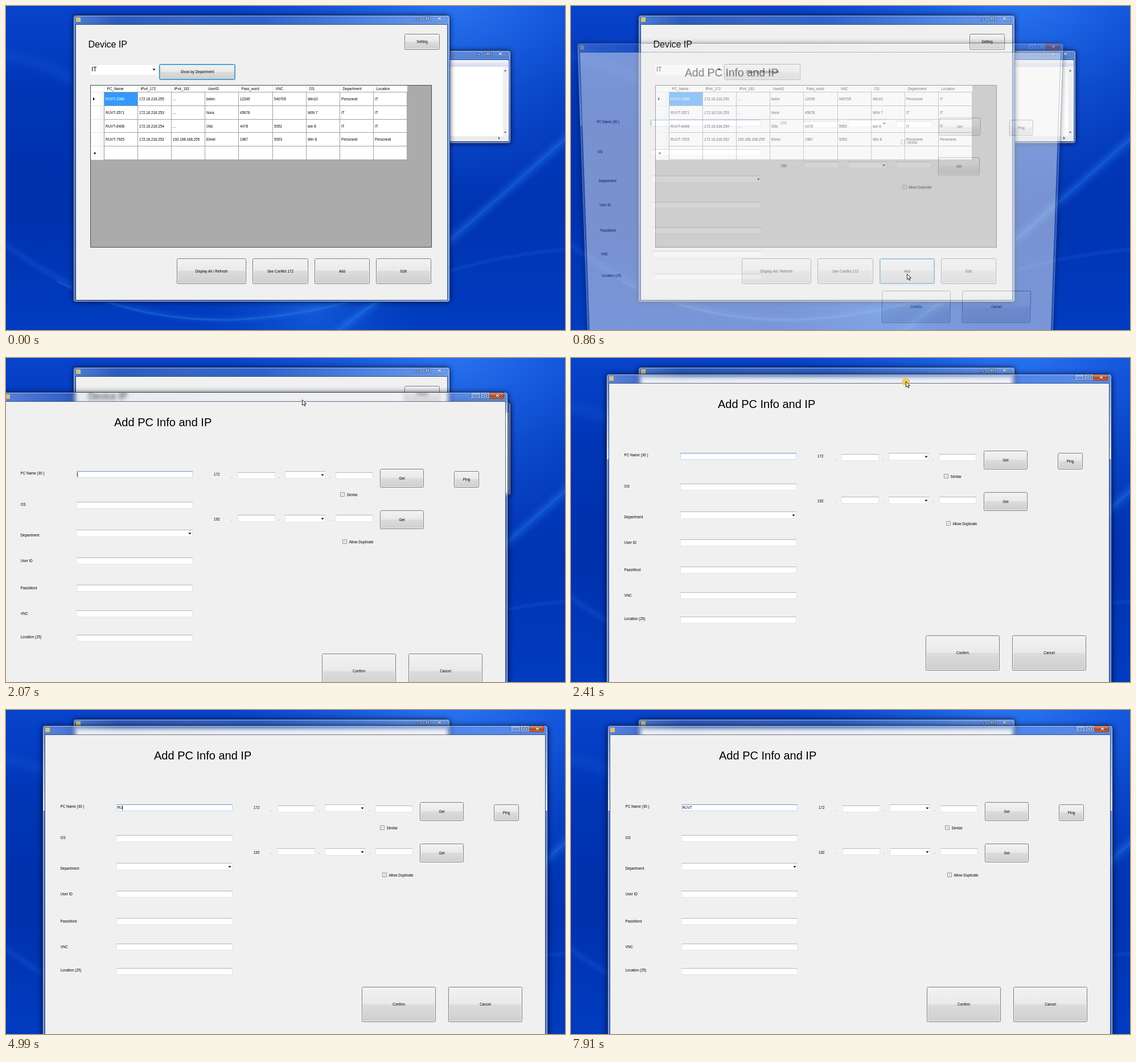
These frames come from a looping animation (982 by 570 pixels, 8 s). An HTML page with a canvas:

```html
<!DOCTYPE html>
<html lang="en">
<head>
<meta charset="utf-8">
<title>Device IP</title>
<style>
  html, body { margin: 0; width: 100%; height: 100%; overflow: hidden; background: #0037b9; }
  #stage { position: relative; width: 982px; height: 570px; overflow: hidden; }
  canvas { position: absolute; left: 0; top: 0; display: block; }
  #dialog {
    position: absolute; left: 64px; top: 27px; width: 888px; height: 651px;
    border-radius: 6px; transform-origin: 442px 170px;
    box-shadow: 0 1px 10px 1px rgba(0, 0, 20, .65);
  }
</style>
</head>
<body>
<div id="stage">
  <canvas id="desk" width="982" height="570"></canvas>
  <div id="dialog"><canvas id="form" width="888" height="651"></canvas></div>
  <canvas id="pointer" width="982" height="570"></canvas>
</div>
<script>
const LOOP = 8000, STEP = 171.9;
const FONT = '"Liberation Sans", Arial, sans-serif';
const context = id => document.getElementById(id).getContext('2d');
const desk = context('desk'), form = context('form'), pointer = context('pointer');
const dialog = document.getElementById('dialog');

const FIRST_SHOWN = 5;               // step at which the dialog starts to open
const TYPED = 'RUVT', KEY_STEPS = [25, 29, 33, 37];
const ADD = [591, 472], GRAB = [521, 74];

// ---------- drawing helpers ----------
function rect(c, x, y, w, h, color) {
  c.fillStyle = color;
  c.fillRect(x, y, w, h);
}

function outline(c, x, y, w, h, color, radius = 0) {
  c.beginPath();
  c.roundRect(x + .5, y + .5, w - 1, h - 1, radius);
  c.strokeStyle = color;
  c.lineWidth = 1;
  c.stroke();
}

function gradient(c, x0, y0, x1, y1, ...stops) {
  const g = c.createLinearGradient(x0, y0, x1, y1);
  stops.forEach(([at, color]) => g.addColorStop(at, color));
  return g;
}

// y is the middle of the capital letters
function label(c, text, x, y, size = 6.3, color = '#000', align = 'left') {
  c.font = `${size}px ${FONT}`;
  c.textAlign = align;
  c.fillStyle = color;
  c.fillText(text, x, y + size * .36);
}

function button(c, text, x, y, w, h, lit = false) {
  c.beginPath();
  c.roundRect(x, y, w, h, 2);
  c.fillStyle = gradient(c, 0, y, 0, y + h,
    [0, '#f3f3f3'], [.49, '#e9e9e9'], [.5, '#dcdcdc'], [1, '#cecece']);
  c.fill();
  outline(c, x, y, w, h, lit ? '#3c7fb1' : '#7c7c7c', 2);
  outline(c, x + 1, y + 1, w - 2, h - 2, lit ? '#5fc4f0' : '#f4f4f4', 1);
  label(c, text, x + w / 2, y + h / 2, 6.3, '#000', 'center');
}

function field(c, x, y, w, h = 12, focused = false) {
  rect(c, x, y, w, h, '#fff');
  outline(c, x, y, w, h, focused ? '#c3d8ef' : '#e3e5ea');
  rect(c, x, y, w, 1, focused ? '#6596dc' : '#b4b6bb');
}

function triangle(c, ...points) {
  c.beginPath();
  points.forEach(([x, y]) => c.lineTo(x, y));
  c.fillStyle = '#000';
  c.fill();
}

function combo(c, x, y, w, h = 13) {
  field(c, x, y, w, h);
  const ax = x + w - 5, ay = y + h / 2 - 1;
  triangle(c, [ax - 2.5, ay], [ax + 2.5, ay], [ax, ay + 3]);
}

function checkbox(c, text, x, y) {
  rect(c, x, y, 8, 8, '#fff');
  outline(c, x, y, 8, 8, '#8a8d92');
  rect(c, x + 2, y + 2, 4, 4, '#d9dce0');
  label(c, text, x + 11.5, y + 4.3);
}

function captionButtons(c, right, y, active) {
  const left = right - 65, line = `rgba(20,40,80,${active ? .5 : .12})`;
  if (active) {
    rect(c, left, y + 1, 59, 11, gradient(c, 0, y, 0, y + 12,
      [0, 'rgba(255,255,255,.45)'], [.5, 'rgba(255,255,255,.15)'], [1, 'rgba(255,255,255,.3)']));
    rect(c, right - 31, y + 1, 25, 11,
      gradient(c, 0, y, 0, y + 12, [0, '#dd9a82'], [.48, '#c55f3e'], [.5, '#b03a14'], [1, '#d0713a']));
  }
  outline(c, left, y, 59, 12, line, 2);
  [right - 48, right - 32].forEach(x => rect(c, x, y + 1, 1, 10, line));

  const edge = 'rgba(40,56,90,.75)';
  rect(c, right - 59, y + 6, 7, 3, edge);
  rect(c, right - 58, y + 7, 5, 1, '#fff');
  rect(c, right - 43, y + 3, 8, 6, edge);
  outline(c, right - 42, y + 4, 6, 4, '#fff');
  for (const [color, width] of [[edge, 2.6], ['#fff', 1.3]]) {
    c.beginPath();
    c.moveTo(right - 20, y + 4); c.lineTo(right - 15, y + 8);
    c.moveTo(right - 15, y + 4); c.lineTo(right - 20, y + 8);
    c.strokeStyle = color;
    c.lineWidth = width;
    c.stroke();
  }
}

function windowFrame(c, x, y, w, h, glass, active = false) {
  c.beginPath();
  c.roundRect(x, y, w, h, 5);
  c.fillStyle = glass;
  c.fill();
  c.shadowBlur = 0;
  outline(c, x, y, w, h, 'rgba(12,24,54,.8)', 5);
  outline(c, x + 1, y + 1, w - 2, h - 2, 'rgba(225,238,255,.65)', 4);
  if (active) {
    const shine = gradient(c, 0, y + 15, 0, y + 150,
      [0, 'rgba(255,255,255,.1)'], [1, 'rgba(255,255,255,.75)']);
    rect(c, x + 1, y + 15, 3, 135, shine);
    rect(c, x + w - 4, y + 15, 3, 135, shine);
  }
  rect(c, x + 5, y + 17, w - 10, h - 21, '#f0f0f0');
  outline(c, x + 4, y + 16, w - 8, h - 19, 'rgba(40,60,100,.7)');
  rect(c, x + 5, y + 4, 8, 8, '#d9c077');
  captionButtons(c, x + w - 1, y, active);
}

// ---------- desktop ----------
function glow(c, color, width, blur, path) {
  c.filter = `blur(${blur}px)`;
  c.strokeStyle = color;
  c.lineWidth = width;
  c.stroke(new Path2D(path));
  c.filter = 'none';
}

function radial(c, x, y, r, color, clear) {
  const g = c.createRadialGradient(x, y, 0, x, y, r);
  g.addColorStop(0, color);
  g.addColorStop(1, clear);
  rect(c, 0, 0, 982, 570, g);
}

function wallpaper(c) {
  rect(c, 0, 0, 982, 570, gradient(c, 0, 0, 0, 570,
    [0, '#0743cc'], [.25, '#0038b9'], [.65, '#0034b2'], [1, '#003cbf']));
  radial(c, 780, -50, 400, 'rgba(56,138,255,.8)', 'rgba(30,100,240,0)');
  radial(c, 50, 300, 210, 'rgba(0,44,165,.5)', 'rgba(0,44,165,0)');
  radial(c, 540, 530, 190, 'rgba(40,120,240,.5)', 'rgba(20,90,220,0)');
  glow(c, 'rgba(40,125,240,.35)', 6, 4, 'M-20 405Q170 556 400 552Q520 546 640 505');
  glow(c, 'rgba(90,170,255,.4)', 1.5, 1, 'M90 484Q230 556 400 552Q520 546 620 515');
  glow(c, 'rgba(40,130,245,.45)', 11, 6, 'M1000 218Q880 325 780 412T560 590');
  glow(c, 'rgba(70,150,255,.25)', 2, 1, 'M1000 218Q880 325 780 412T560 590');
  glow(c, 'rgba(45,125,240,.35)', 3, 2, 'M1000 426Q870 438 780 466T590 560');
  glow(c, 'rgba(35,105,235,.3)', 14, 8, 'M-20 82Q60 96 130 135');
}

function notesWindow(c) {
  c.shadowColor = 'rgba(0,0,20,.7)';
  c.shadowBlur = 10;
  windowFrame(c, 600, 78, 287, 164,
    gradient(c, 0, 78, 0, 242, [0, '#5a88dc'], [1, '#3d68c0']));
  rect(c, 770, 96, 113, 142, '#fff');
  rect(c, 770, 96, 113, 11, gradient(c, 0, 96, 0, 107, [0, '#f6f8fd'], [.5, '#dfe4f4'], [1, '#d6dced']));
  rect(c, 873, 108, 9, 121, '#efefef');
  rect(c, 770, 229, 113, 9, '#ececec');
  c.globalAlpha = .6;
  triangle(c, [875, 115], [879, 115], [877, 112]);
  triangle(c, [875, 221], [879, 221], [877, 224]);
  triangle(c, [865, 230], [865, 235], [868, 232.5]);
  c.globalAlpha = 1;
}

const COLUMNS = ['PC_Name', 'IPv4_172', 'IPv4_192', 'UserID', 'Pass_word', 'VNC', 'OS', 'Department', 'Location'];
const ROWS = [
  ['RUVT-2086', '172.16.216.255', '...', 'belim', '12345', '540705', 'Win10', 'Personnel', 'IT'],
  ['RUVT-3571', '172.16.216.253', '...', 'Nora', '45678', '', 'WIN 7', 'IT', 'IT'],
  ['RUVT-6408', '172.16.216.254', '...', 'Otis', '4478', '5052', 'win 8', 'IT', 'IT'],
  ['RUVT-7925', '172.16.216.252', '192.168.168.255', 'Elmer', '1987', '5053', 'Win 8', 'Personnel', 'Personnel'],
];

function deviceGrid(c) {
  const colX = i => Math.round(173 + i * 59.1), rowY = i => Math.round(151.3 + i * 23.7);
  const right = colX(9), bottom = rowY(5);
  rect(c, 148, 139, 600, 286, '#ababab');
  rect(c, 149, 140, right - 149, bottom - 140, '#fff');
  rect(c, 149, 151, 23, bottom - 151, gradient(c, 149, 0, 172, 0, [0, '#fff'], [.6, '#fcfdfe'], [1, '#f1f4f8']));
  rect(c, colX(0), rowY(0), 59, 24, '#3399ff');
  COLUMNS.forEach((name, i) => {
    rect(c, colX(i) - 1, 140, 1, 11, '#e2e5ea');
    rect(c, colX(i) - 1, 151, 1, bottom - 151, '#a0a0a0');
    label(c, name, colX(i) + 4.5, 146);
  });
  rect(c, right - 1, 151, 1, bottom - 151, '#a0a0a0');
  for (let r = 0; r <= 5; r++) {
    rect(c, 149, rowY(r), 23, 1, '#e2e5ea');
    rect(c, 172, rowY(r), right - 172, 1, '#a0a0a0');
  }
  ROWS.forEach((row, r) => row.forEach((text, i) =>
    label(c, text, colX(i) + 2, rowY(r) + 12.3, 6.3, r || i ? '#000' : '#fff')));
  triangle(c, [153, 160.5], [153, 166.5], [156, 163.5]);
  rect(c, 154.5, 257.5, 3, 3, '#222');
  outline(c, 148, 139, 600, 286, '#4a4a4a');
}

function deviceWindow(c, addLit) {
  c.shadowColor = 'rgba(0,0,20,.7)';
  c.shadowBlur = 10;
  windowFrame(c, 118, 16, 662, 505, gradient(c, 118, 0, 779, 60,
    [0, '#4f7fd4'], [.12, '#2c5cbb'], [.3, '#3665c2'], [.5, '#2f63c8'], [.75, '#4a7fdc'], [1, '#6f9cea']));
  label(c, 'Device IP', 144.5, 67.5, 16);
  button(c, 'Setting', 700, 49, 62, 28);
  rect(c, 148, 102, 118, 19, '#fff');
  rect(c, 148, 102, 118, 1, '#dcdfe4');
  triangle(c, [257.5, 110.5], [262.5, 110.5], [260, 113.5]);
  label(c, 'IT', 150, 111, 10.5);
  button(c, 'Show by Department', 269, 102, 134, 28, !addLit);
  deviceGrid(c);
  button(c, 'Display All / Refresh', 300, 444, 122, 45);
  button(c, 'See Conflict 172', 433, 444, 98, 45);
  button(c, 'Add', 542, 444, 97, 45, addLit);
  button(c, 'Edit', 650, 444, 97, 45);
}

// ---------- dialog, laid out at its resting place ----------
function addForm(c, typed, caretOn) {
  c.clearRect(0, 0, 888, 651);
  c.save();
  c.translate(-64, -27);
  windowFrame(c, 64, 27, 888, 651, gradient(c, 64, 0, 952, 0,
    [0, 'rgba(255,255,255,.35)'], [.15, 'rgba(200,215,235,.2)'], [.7, 'rgba(235,240,250,.15)'], [1, 'rgba(255,255,255,.3)']), true);
  label(c, 'Add PC Info and IP', 260, 79.8, 20);

  [['PC Name (30 )', 170, 166], ['OS', 224.5, 220], ['Department', 279, 269], ['User ID', 323.5, 318],
   ['PassWord', 371.5, 366], ['VNC', 417, 411], ['Location (25)', 458, 454]].forEach(([text, y, top], i) => {
    label(c, text, 95.5, y);
    if (i === 2) combo(c, 194, top, 204);
    else field(c, 194, top, 204, 12, i === 0);
  });
  label(c, typed, 195.5, 171.8);
  if (caretOn) rect(c, Math.floor(195.5 + c.measureText(typed).width), 168, 1, 8, '#333');

  [['172', 171.5, 168, 166, 162], ['192', 250.5, 243, 243, 235]].forEach(([net, y, top, comboTop, buttonTop]) => {
    label(c, net, 435, y);
    [466, 549, 638].forEach(x => rect(c, x, top + 9, 1, 1, '#777'));
    field(c, 477, top, 66);
    combo(c, 560, comboTop, 71);
    field(c, 649, top, 65);
    button(c, 'Get', 727, buttonTop, 77, 33);
  });
  checkbox(c, 'Similar', 657, 203);
  checkbox(c, 'Allow Duplicate', 661, 286);
  button(c, 'Ping', 857, 166, 44, 29);
  button(c, 'Confirm', 625, 487, 130, 62);
  button(c, 'Cancel', 777, 487, 130, 62);
  c.restore();
}

function placeDialog(step) {
  dialog.style.display = step < FIRST_SHOWN ? 'none' : 'block';
  const opened = step === 5 ? .5 : step === 6 ? .95 : 1;
  const drag = Math.min(1, Math.max(0, (step - 12) / 2));
  const dx = step >= 15 ? 0 : Math.round(-70 + 68 * drag);
  const dy = step >= 15 ? 0 : Math.round(33 - 32 * drag);
  const away = (1 - opened) * 2;
  const tilt = away
    ? ` perspective(1000px) rotateX(${-4.8 * away}deg) scale(${1 - .05 * away}, ${1 - .04 * away})` : '';
  dialog.style.transform = `translate(${dx}px, ${dy}px)${tilt}`;
  dialog.style.opacity = opened;
  dialog.style.backdropFilter = away ? 'none' : 'blur(3px)';
}

// ---------- pointer ----------
function pointerAt(step) {
  const glide = (from, to, k) => from.map((v, i) => Math.round(v + (to[i] - v) * k));
  if (step <= 3) return glide([640, 582], ADD, 1 - (1 - step / 3) ** 1.5);
  if (step <= 7) return ADD;
  if (step <= 12) {
    const k = (step - 7) / 5;
    return glide(ADD, GRAB, k * k * (3 - 2 * k));
  }
  if (step <= 14) return glide(GRAB, [589, 42], (step - 12) / 2);
  if (step === 15) return [591, 41];
  return glide([591, 41], [343, 171], [.25, .75, 1][Math.min(step, 18) - 16]);
}

function drawPointer(c, step) {
  c.clearRect(0, 0, 982, 570);
  if (step < 1 || step >= KEY_STEPS[0]) return;
  const [x, y] = pointerAt(step);
  if (step >= 18) {
    rect(c, x, y - 4, 1, 9, '#000');
    for (const end of [-5, 4]) {
      rect(c, x - 2, y + end, 2, 1, '#000');
      rect(c, x + 1, y + end, 2, 1, '#000');
    }
    return;
  }
  if (step === 4 || (step >= 13 && step <= 15)) {
    c.beginPath();
    c.arc(x - .5, y, 7, 0, 7);
    c.fillStyle = 'rgba(250,190,50,.75)';
    c.fill();
  }
  c.save();
  c.translate(x - .5, y - .5);
  c.scale(.6, .6);
  const arrow = new Path2D('M0 0V16L4 12.5L6.5 18.5L9 17.4L6.5 11.6H11.5Z');
  c.fillStyle = '#fff';
  c.fill(arrow);
  c.strokeStyle = '#000';
  c.lineWidth = 1.4;
  c.stroke(arrow);
  c.restore();
}

// ---------- playback ----------
let shownStep = -1;

function render(step) {
  wallpaper(desk);
  notesWindow(desk);
  deviceWindow(desk, step >= 4);
  const keys = KEY_STEPS.filter(at => at <= step);
  const blinkStart = keys.length ? keys[keys.length - 1] : FIRST_SHOWN;
  const caretOn = Math.floor((step - blinkStart) / 3) % 2 === 0;
  addForm(form, TYPED.slice(0, keys.length), caretOn);
  placeDialog(step);
  drawPointer(pointer, step);
}

const start = performance.now();
function tick() {
  const time = (performance.now() - start) % LOOP;
  const step = Math.floor((time + 10) / STEP);
  if (step !== shownStep) render(shownStep = step);
  requestAnimationFrame(tick);
}
tick();
</script>
</body>
</html>
```
